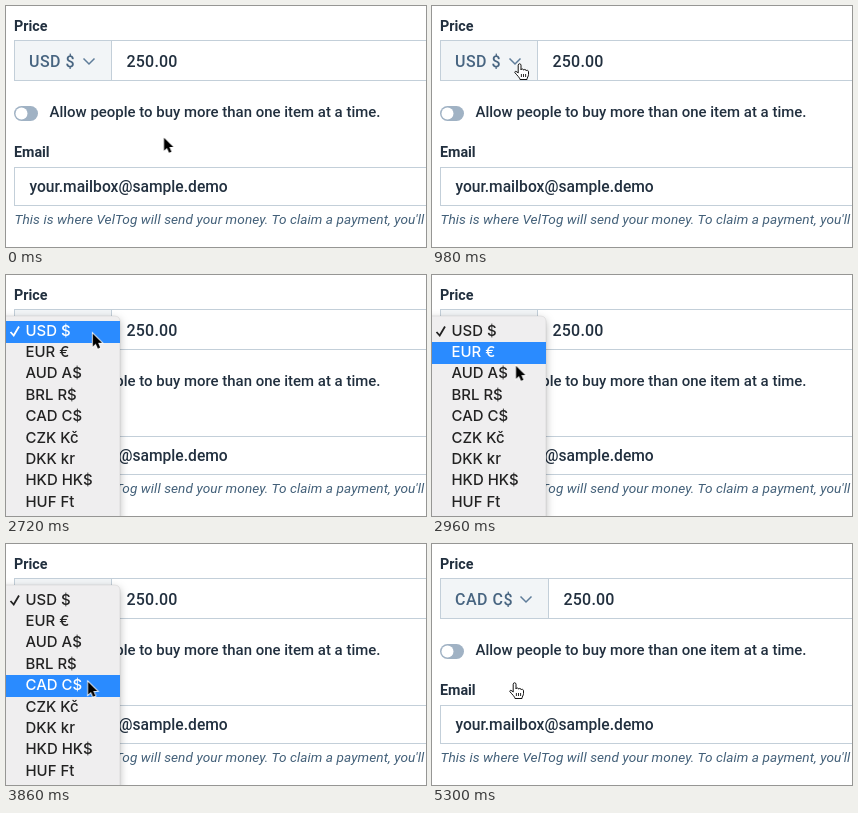
An HTML page for the animation above (5.86 s loop, 420 px wide and 241 px high).

```html
<!DOCTYPE html>
<html lang="en">
<head>
<meta charset="utf-8">
<title>Currency select</title>
<style>
html, body { margin: 0; width: 100%; height: 100%; overflow: hidden; background: #fff; }
svg { display: block; width: 420px; height: 241px; }

.form { font: 450 15.62px Roboto, sans-serif; fill: #22303f; }
.label { font-size: 14.3px; font-weight: 600; }
.toggle-label { font-size: 14.94px; }
.amount { font-size: 16px; letter-spacing: .2px; }
.code { font-size: 16px; letter-spacing: .5px; fill: #486581; }
.hint { font-size: 13.6px; font-style: italic; letter-spacing: .09px; fill: #436079; }
.line { fill: none; stroke: #c3cfd9; }
.chevron { fill: none; stroke: #5f7d9a; stroke-width: 1.5; }

.menu { font: 450 14.95px Inter, sans-serif; filter: drop-shadow(0 3px 4px rgba(0, 0, 0, .28)); }
.panel { fill: #efeeef; stroke: rgba(0, 0, 0, .14); stroke-width: .5; }
.item { color: #222; }
.item text { fill: currentColor; }
.item rect { fill: #2a8bff; opacity: 0; }
.check { fill: none; stroke: currentColor; stroke-width: 1.8; }

/* One loop is 5860 ms, so 1% is 58.6 ms. */
.menu, .cursor { animation: 5860ms linear infinite; }
.before, .after, .arrow, .hand, .item, .item rect { animation: 5860ms step-end infinite; }
.before { animation-name: before; }
.after { animation-name: after; }
.menu { animation-name: menu; }
.cursor { animation-name: travel; }
.arrow { animation-name: arrow; }
.hand { animation-name: hand; }

.usd { animation-name: usd-text; }
.usd rect { animation-name: usd-bar; }
.eur { animation-name: eur-text; }
.eur rect { animation-name: eur-bar; }
.aud { animation-name: aud-text; }
.aud rect { animation-name: aud-bar; }
.brl { animation-name: brl-text; }
.brl rect { animation-name: brl-bar; }
.cad { animation-name: cad-text; }
.cad rect { animation-name: cad-bar; }

@keyframes before { 0% { opacity: 1; } 86.348%, 100% { opacity: 0; } }
@keyframes after { 0% { opacity: 0; } 86.348%, 100% { opacity: 1; } }

@keyframes menu {
  0% { opacity: 0; animation-timing-function: step-end; }
  29.693%, 79.863% { opacity: 1; }
  83.959%, 100% { opacity: 0; }
}

@keyframes travel {
  0% { transform: translate(157px, 131px); }
  3.754% { transform: translate(157px, 131px); animation-timing-function: ease-in-out; }
  13.652% { transform: translate(94px, 63px); animation-timing-function: ease-out; }
  16.724% { transform: translate(86px, 56px); }
  29.693% { transform: translate(86px, 56px); }
  32.423% { transform: translate(86px, 55px); }
  46.075% { transform: translate(86px, 55px); }
  50.512% { transform: translate(83px, 90px); }
  55.973% { transform: translate(80px, 119px); }
  56.314% { transform: translate(80px, 119px); animation-timing-function: ease-in-out; }
  65.870%, 100% { transform: translate(81px, 137px); }
}

@keyframes arrow {
  0% { opacity: 1; }
  10.97% { opacity: 0; }
  29.693% { opacity: 1; }
  83.959%, 100% { opacity: 0; }
}
@keyframes hand {
  0% { opacity: 0; }
  10.97% { opacity: 1; }
  29.693% { opacity: 0; }
  83.959%, 100% { opacity: 1; }
}

@keyframes usd-text { 0% { color: #fff; } 47.816%, 100% { color: #222; } }
@keyframes usd-bar { 0% { opacity: 1; } 47.816%, 100% { opacity: 0; } }
@keyframes eur-text { 47.816% { color: #fff; } 50.853% { color: #222; } }
@keyframes eur-bar { 47.816% { opacity: 1; } 50.853% { opacity: 0; } }
@keyframes aud-text { 50.853% { color: #fff; } 54.573% { color: #222; } }
@keyframes aud-bar { 50.853% { opacity: 1; } 54.573% { opacity: 0; } }
@keyframes brl-text { 54.573% { color: #fff; } 61.433% { color: #222; } }
@keyframes brl-bar { 54.573% { opacity: 1; } 61.433% { opacity: 0; } }
/* The chosen row blinks once when clicked. */
@keyframes cad-text {
  61.433% { color: #fff; }
  77.133% { color: #222; }
  78.157%, 100% { color: #fff; }
}
@keyframes cad-bar {
  61.433% { opacity: 1; }
  77.133% { opacity: 0; }
  78.157%, 100% { opacity: 1; }
}
</style>
</head>
<body>
<svg viewBox="0 0 420 241">
  <g class="form">
    <text class="label" x="8" y="25">Price</text>
    <g class="before">
      <rect x="8.5" y="35" width="97" height="39" fill="#f2f5f7"/>
      <path class="line" d="M105.5 35V74"/>
      <text class="code" x="23" y="61">USD $</text>
      <path class="chevron" d="M77.5 52.5L83 58L88.5 52.5"/>
      <text class="amount" x="120.5" y="61">250.00</text>
    </g>
    <g class="after">
      <rect x="8.5" y="35" width="108" height="39" fill="#f2f5f7"/>
      <path class="line" d="M116.5 35V74"/>
      <text class="code" x="23" y="61">CAD C$</text>
      <path class="chevron" d="M88.5 52.5L94 58L99.5 52.5"/>
      <text class="amount" x="131.5" y="61">250.00</text>
    </g>
    <rect class="line" x="8.5" y="34.5" width="430" height="40"/>

    <rect x="8" y="100" width="24" height="15" rx="7.5" fill="#a0b2c4"/>
    <circle cx="15.5" cy="107.5" r="6" fill="#fff"/>
    <text class="toggle-label" x="43.5" y="111">Allow people to buy more than one item at a time.</text>

    <text class="label" x="8" y="151">Email</text>
    <rect class="line" x="8.5" y="161.5" width="430" height="38"/>
    <text x="23.5" y="186">your.mailbox@sample.demo</text>
    <text class="hint" x="8.5" y="218">This is where VelTog will send your money. To claim a payment, you'll</text>
  </g>

  <g class="menu">
    <rect class="panel" x="-20" y="41" width="114" height="260" rx="5" transform="translate(20 0)" visibility="hidden"/>
    <rect class="panel" x="-20" y="41" width="134" height="260" rx="5"/>
    <g id="items"></g>
  </g>

  <g class="cursor">
    <path class="arrow" transform="translate(1 .7) scale(.93)" d="M0 0V14L3.2 11L5.5 16.2L8 15.1L5.8 10H10Z" stroke="#fff" stroke-width="1.8" paint-order="stroke"/>
    <g class="hand" transform="translate(-4 1)" stroke="#111" stroke-linejoin="round">
      <path fill="#fff" d="M4.2 10V2.2C4.2.3 7 .3 7 2.2V7C7 5.6 9.6 5.7 9.7 7.2C9.8 6 12.2 6.2 12.2 7.8C12.4 6.9 14.5 7.1 14.5 8.8V11.5C14.5 13.5 13 14.5 13 16.5H6C6 15 3.3 12.5 1 9.8C.2 8.6 1.8 7.3 4.2 10Z"/>
      <path fill="none" stroke-width=".9" d="M7.4 11V14M9.5 11V14M11.6 11V14"/>
    </g>
  </g>
</svg>
<script>
const rowPitch = 21.4;
const currencies = ["USD $", "EUR €", "AUD A$", "BRL R$", "CAD C$", "CZK Kč", "DKK kr", "HKD HK$", "HUF Ft"];
const check = '<path class="check" d="M4.5 11L7.7 14.5L13 5.5"/>';

// Rows snap to whole pixels.
document.getElementById("items").innerHTML = currencies.map((name, i) => `
  <g class="item ${name.slice(0, 3).toLowerCase()}" transform="translate(0 ${Math.floor(46 + i * rowPitch)})">
    <rect width="114" height="22"/>
    ${i ? "" : check}
    <text x="19.5" y="15">${name}</text>
  </g>`).join("");
</script>
</body>
</html>
```
